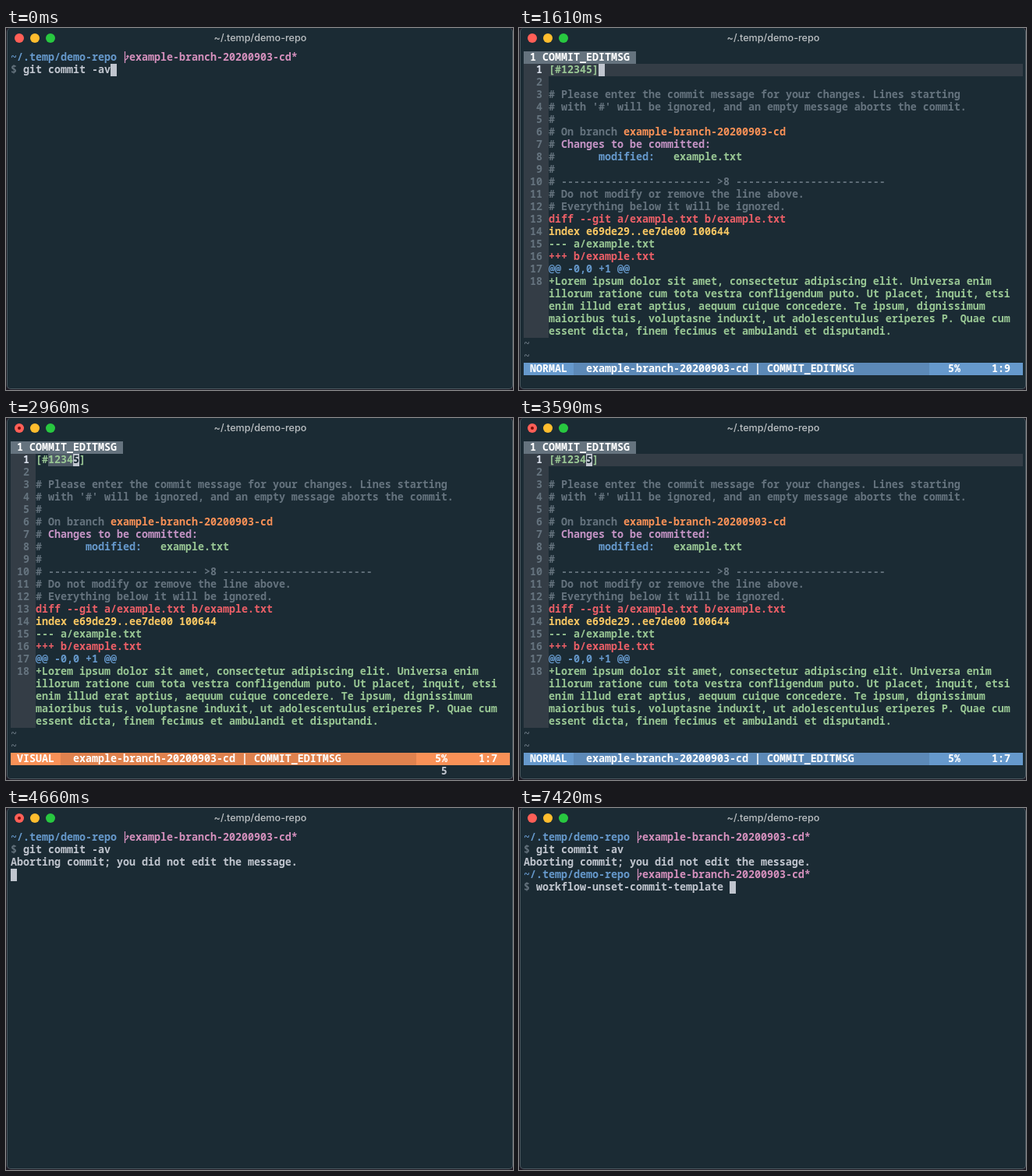
An HTML page that plays this animation: 650x465 px, repeating every 8000 ms.

```html
<!DOCTYPE html>
<html lang="en">
<head>
<meta charset="utf-8">
<title>Terminal</title>
<style>
  html, body { margin: 0; width: 100%; height: 100%; overflow: hidden; background: #1d1a24; }
  #win { position: absolute; inset: 0 0 1px 1px; box-sizing: border-box; background: #1b2b34;
    border: 1px solid #4d5961; border-top: 0; border-radius: 5px; }
  #title { position: absolute; left: 1px; top: 5px; width: 650px; text-align: center; color: #bcc0c3;
    font: 500 12.6px/16px Inter, sans-serif; }
  .light { position: absolute; top: 7px; width: 12px; height: 12px; border-radius: 50%; }
  #dot { position: absolute; left: 15px; top: 11px; width: 4px; height: 4px; border-radius: 50%; background: #7c0d08; }
  #screen { position: absolute; left: 6px; top: 30px; width: 640px; color: #c0c5ce;
    font: 600 13.3333px "Noto Sans Mono", monospace; font-variant-ligatures: none; }
  .row { display: flex; height: 16px; white-space: pre; }
  .row span { height: 16px; line-height: 14px; }
  .row svg { width: 8px; height: 16px; overflow: visible; fill: none; stroke: #d590bd; stroke-width: 1.3; }
  .grey { color: #65737e; } .blue { color: #6699cc; } .pink { color: #d590bd; } .purple { color: #c594c5; }
  .green { color: #99c794; } .red { color: #ec5f67; } .yellow { color: #fac863; } .orange { color: #f99157; }
  .bold { font-weight: 800; }
  .num { color: #65737e; background: #343d46; }
  .now { color: #d8dee9; font-weight: 800; }
  .here { background: #343d46; }
  .tab { color: #fff; background: #65737e; }
  .cur { color: #1b2b34; background: #c0c5ce; }
  .sel { color: #99c794; background: #4f5b66; }
  .match { color: #c0c5ce; background: #65737e; }
  .bar { color: #fff; background: #6699cc; }
  .bar.VISUAL { background: #f99157; }
  .mid { flex: 1; background: #0000001a; }
</style>
</head>
<body>
<div id="win"></div>
<div class="light" style="left:11px;background:#ff5f57"></div>
<div class="light" style="left:31px;background:#ffbd2e"></div>
<div class="light" style="left:51px;background:#28c840"></div>
<div id="dot"></div>
<div id="title">~/.temp/demo-repo</div>
<div id="screen"></div>
<script>
const LOOP = 8000;
const BRANCH = 'example-branch-20200903-cd';
const span = (text, cls = '') => `<span class="${cls}">${text}</span>`;
const row = (html, cls = '') => `<div class="row ${cls}">${html}</div>`;
const cursor = span(' ', 'cur');

// Shell screen
const icon = '<svg viewBox="0 0 8 16"><path d="M2.5 0V15M2.5 11.5L6 8.5V5.5M4.5 7L6 5.5L7.5 7"/></svg>';
const prompt = row(span('~/.temp/demo-repo ', 'blue') + icon + span(BRANCH + '*', 'pink'));
const command = (text, tail = cursor) => row(span('$ ', 'grey') + span(text) + tail);
const aborted = prompt + command('git commit -av', '') +
  row(span('Aborting commit; you did not edit the message.'));
const typed = text => aborted + prompt + command(text);

// Editor screen
const note = text => span('# ' + text, 'grey');
const dashes = '-'.repeat(24);
const body = [
  '',
  note('Please enter the commit message for your changes. Lines starting'),
  note("with '#' will be ignored, and an empty message aborts the commit."),
  note(''),
  note('On branch ') + span(BRANCH, 'orange bold'),
  note('') + span('Changes to be committed:', 'purple'),
  note('      ') + span('modified:   ', 'blue') + span('example.txt', 'green bold'),
  note(''),
  note(`${dashes} >8 ${dashes}`),
  note('Do not modify or remove the line above.'),
  note('Everything below it will be ignored.'),
  span('diff --git a/example.txt b/example.txt', 'red'),
  span('index e69de29..ee7de00 100644', 'yellow'),
  span('--- a/example.txt', 'green'),
  span('+++ b/example.txt', 'red'),
  span('@@ -0,0 +1 @@', 'blue'),
  ...['+Lorem ipsum dolor sit amet, consectetur adipiscing elit. Universa enim',
    'illorum ratione cum tota vestra confligendum puto. Ut placet, inquit, etsi',
    'enim illud erat aptius, aequum cuique concedere. Te ipsum, dignissimum',
    'maioribus tuis, voluptasne induxit, ut adolescentulus eriperes P. Quae cum',
    'essent dicta, finem fecimus et ambulandi et disputandi.'].map(t => span(t, 'green')),
];
const gutter = (n, cls = '') => span(String(n).padStart(3) + ' ', 'num ' + cls);
const bodyRows = body.map((html, i) => row(gutter(i < 17 ? i + 2 : '') + html)).join('');
const tilde = row(span('~', 'grey'));

function editor(mode, col, { from = col, match = -1, foot = '' } = {}) {
  const subject = [...'[#12345] '].map((ch, i) => span(ch,
    i === col && mode !== 'COMMAND' ? 'cur' : i >= from && i < col ? 'sel' : i === match ? 'match' : 'green'));
  return row(span(' 1 COMMIT_EDITMSG ', 'tab')) +
    row(gutter(1, 'now') + subject.join(''), mode === 'VISUAL' ? '' : 'here') +
    bodyRows + tilde + tilde +
    row(span(` ${mode} `) + span(`  ${BRANCH} | COMMIT_EDITMSG`, 'mid') +
      span(`   5%     1:${col + 1}  `), 'bar ' + mode) +
    row(foot);
}
const count = n => span(' '.repeat(69) + n);

const scenes = [
  [0, prompt + command('git commit -av')],
  [1430, row(cursor)],
  [1610, editor('NORMAL', 8)],
  [2420, editor('NORMAL', 7, { match: 0 })],
  [2600, editor('NORMAL', 6)],
  [2870, editor('VISUAL', 6, { foot: count(1) })],
  [2960, editor('VISUAL', 6, { from: 2, foot: count(5) })],
  [3590, editor('NORMAL', 6)],
  [3950, editor('COMMAND', 6, { foot: span(':') + cursor })],
  [4390, editor('COMMAND', 6, { foot: span(':q') + cursor })],
  [4660, aborted + row(cursor)],
  [4750, typed('')],
  ...[6180, 6270, 6360, 6440, 6620, 6710, 6890, 6980, 7160, 7340]
    .map((t, i) => [t, typed('workflow-u'.slice(0, i + 1))]),
  [7420, typed('workflow-unset-commit-template ')],
];

const screenEl = document.getElementById('screen');
const dot = document.getElementById('dot');
let shown;

function draw(now) {
  const t = now % LOOP;
  const scene = scenes.findLast(([start]) => start <= t);
  if (scene !== shown) screenEl.innerHTML = (shown = scene)[1];
  dot.hidden = t < 1970 || t >= 5470;
  requestAnimationFrame(() => draw(performance.now()));
}
draw(0);
</script>
</body>
</html>
```
